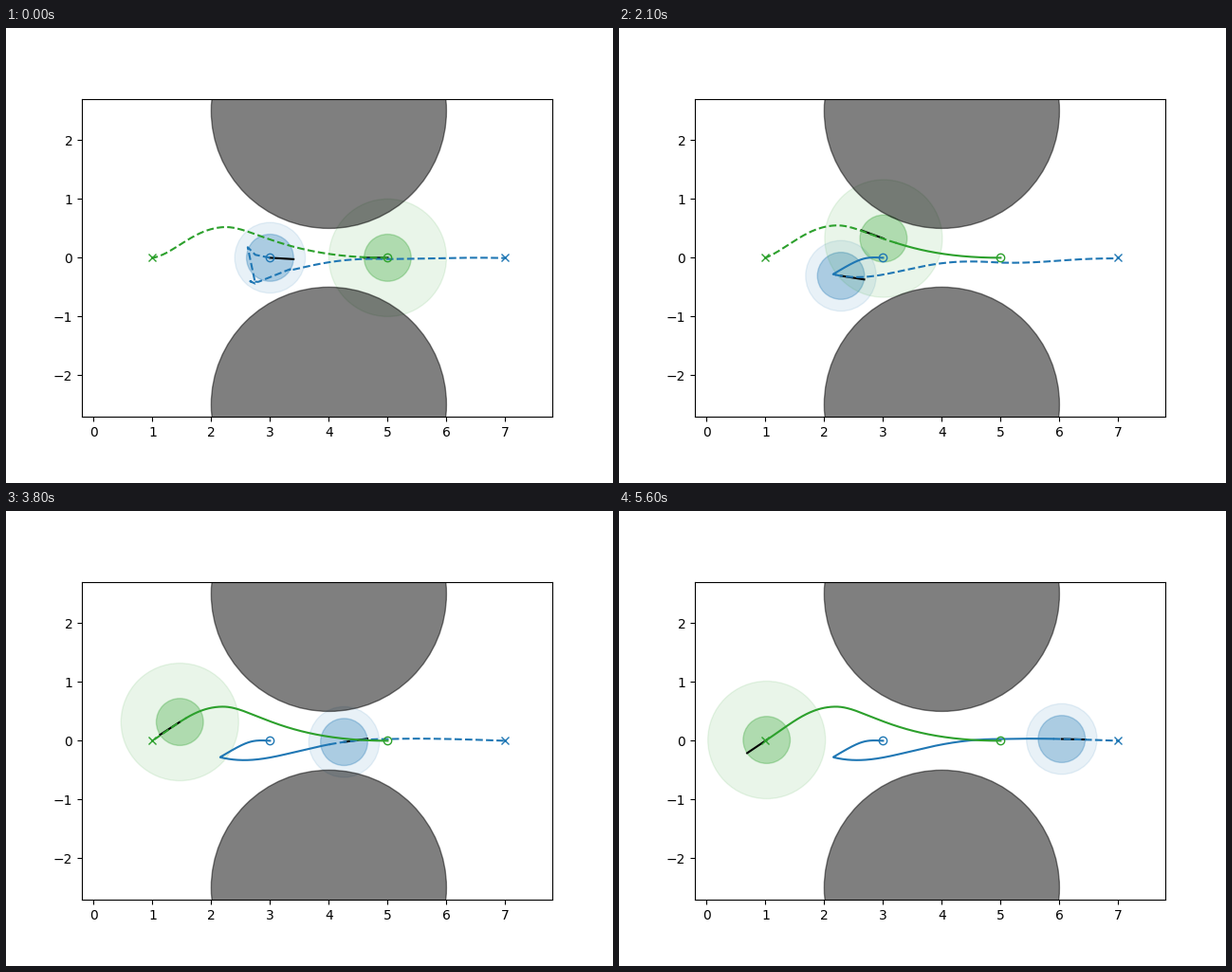
A matplotlib script that plays this animation: 640x480 px, repeating every 5700 ms.

```python
import numpy as np
import matplotlib.pyplot as plt
from matplotlib.animation import FuncAnimation
from matplotlib.patches import Circle

FRAMES, INTERVAL = 57, 100
LAG = 2  # the solid trail ends this many steps behind the robot


def bezier(*points):
    a, b, c, d = np.array(points, float)
    t = np.linspace(0, 1, 200)[:, None]
    return (a * (1 - t) ** 3 + 3 * b * t * (1 - t) ** 2
            + 3 * c * t * t * (1 - t) + d * t ** 3)


def lengths(points):
    """Distance from the first point to every point of a polyline."""
    return np.r_[0, np.cumsum(np.hypot(*np.diff(points, axis=0).T))]


def along(points, dist):
    s = lengths(points)
    return np.column_stack([np.interp(dist, s, c) for c in points.T])


def travelled(times, speeds):
    """Distance covered over time for a piecewise linear speed."""
    t = np.linspace(0, FRAMES - 1, 2000)
    v = np.interp(t, times, speeds)
    dist = np.r_[0, np.cumsum((v[1:] + v[:-1]) / 2 * np.diff(t))]
    return lambda x: np.interp(x, t, dist)


# Blue backs into a corner, waits and then drives out to the right.
BACK = bezier((3, 0), (2.68, .02), (2.62, 0), (2.15, -.28))
BLUE = np.vstack([BACK,
                  bezier((2.15, -.28), (3, -.49), (3.65, .04), (5, .028)),
                  bezier((5, .028), (5.6, .05), (6.3, .025), (7, 0))])
GREEN = np.vstack([bezier((5, 0), (3.2, 0), (2.7, .58), (2.2, .58)),
                   bezier((2.2, .58), (1.75, .58), (1.45, .3), (1, 0))])

# Blue's first guess for the way up to where the lanes meet.
GUESS = np.array([(3, 0), (2.75, .05), (2.62, .18), (2.69, -.15),
                  (2.75, -.44), (2.66, -.4), (2.8, -.41), (3.35, -.19)])


def green_plan(pts, part, i):
    """Early plans hug the goal side of the hump a little lower."""
    u = pts[:, 0] - 1
    pts[:, 1] -= .54 * u * np.exp(-2 * u) * max(0, 1 - (i / 30) ** 2)
    return pts


def blue_plan(pts, part, i):
    """Plans sag to avoid green; the first ones start from the guess."""
    sag = min(.45 + .026 * i, max(0, (30 - i) / 9))
    pts[:, 1] -= .12 * sag * np.exp(-((pts[:, 0] - 5.3) / 1.1) ** 2)
    w = max(0, 1 - i / 6)
    join = lengths(BACK)[-1] + GUESS[-1, 0] - BACK[-1, 0]
    lead = part < join
    if w and lead.any():
        guess = along(GUESS, part[lead] / join * lengths(GUESS)[-1])
        pts[lead] += w * (guess - pts[lead])
    return pts


fig, ax = plt.subplots(figsize=(6.4, 4.8), dpi=100)
ax.set_aspect("equal")
ax.set_xlim(-.2, 7.8)
ax.set_ylim(-2.7, 2.7)
for y in (-2.5, 2.5):
    ax.add_patch(Circle((4, y), 2, color="black", alpha=.5))


class Robot:
    def __init__(self, color, reach, path, dist, plan, back=0):
        self.path, self.dist, self.plan, self.back = path, dist, plan, back
        self.end = lengths(path)[-1]
        self.discs = [ax.add_patch(Circle(path[0], r, color=color, alpha=a, zorder=.9))
                      for r, a in ((reach, .1), (.4, .3))]
        self.nose, = ax.plot([], [], color="black", zorder=1.9)
        self.ahead, = ax.plot([], [], "--", color=color)
        self.trail, = ax.plot([], [], color=color)
        ax.plot(*path[0], "o", color=color, markerfacecolor="none")
        ax.plot(*path[-1], "x", color=color)

    def heading(self, i):
        """Direction of travel, turned round while backing, eased over time."""
        d = self.dist(i + np.linspace(-2, 2, 21))
        step = along(self.path, d + .01) - along(self.path, d - .01)
        step[d < self.back] *= -1
        x, y = step.mean(axis=0)
        return np.array([x, y]) / np.hypot(x, y)

    def show(self, i):
        pos = along(self.path, self.dist([i]))[0]
        for disc in self.discs:
            disc.center = pos
        self.nose.set_data(*np.array([pos, pos + .4 * self.heading(i)]).T)

        d = self.dist(max(0, i - LAG))
        self.trail.set_data(*along(self.path, np.linspace(0, d, 300)).T)
        part = np.linspace(d, self.end, 500)
        true = along(self.path, part)
        pts = self.plan(true.copy(), part, i)
        # Bend the plan so that it leaves from the end of the trail.
        pts += (true[0] - pts[0]) * np.exp(-(part - d) / .4)[:, None]
        self.ahead.set_data(*pts.T)


robots = [
    Robot("tab:blue", .6, BLUE,
          travelled([0, 5, 14, 16.5, 26, 38, 56], [0, .131, 0, 0, .128, .128, .07]),
          blue_plan, back=lengths(BACK)[-1]),
    Robot("tab:green", 1, GREEN,
          travelled([0, 7, 29, 32, 56], [0, .116, .116, .08, 0]), green_plan),
]


def draw(i):
    for robot in robots:
        robot.show(i)
    return []


anim = FuncAnimation(fig, draw, frames=FRAMES, interval=INTERVAL, repeat=True,
                     repeat_delay=0, init_func=lambda: draw(0))
plt.show()
```
